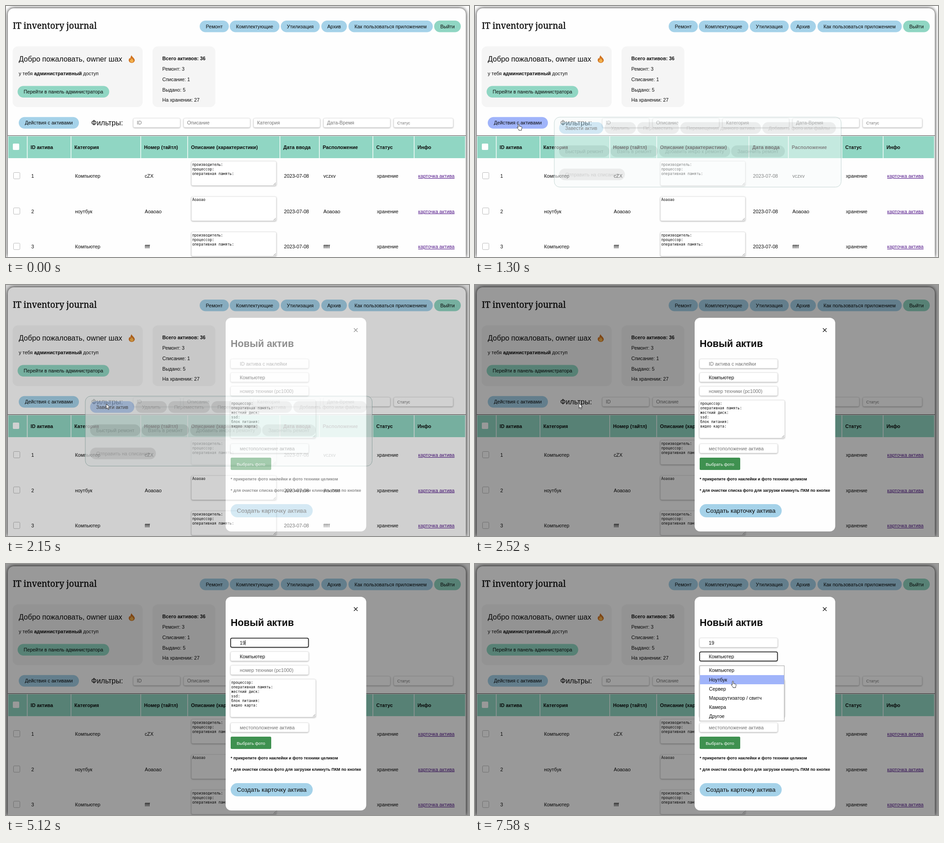
Recreate the animation shown at these times as an HTML page. Size 1016 by 551 pixels, loop 8 s.

```html
<!DOCTYPE html>
<html lang="ru">
<head>
<meta charset="utf-8">
<title>Учёт активов</title>
<style>
html, body { margin: 0; width: 100%; height: 100%; overflow: hidden; background: #fff; }
#page { position: absolute; left: 4px; top: 5px; right: 7px; bottom: 0; border-radius: 13px 13px 0 0;
  background: #fefefe; box-shadow: 0 0 8px rgba(0,0,0,.95); }
svg { position: absolute; left: 0; top: 0; width: 100%; height: 100%; overflow: hidden;
  font: 10.72px "Liberation Sans", Arial, sans-serif; }
text { white-space: pre; fill: #0b0b0b; }
.b { font-weight: 700; }
.ph { fill: #757575; }
.off { fill: #a3a3a3; }
.light { fill: #fff; }
.mono { font: 8px "DejaVu Sans Mono", monospace; }
.title { font: 19px "Noto Serif", serif; stroke: #0b0b0b; stroke-width: .4px; }
.link { fill: #551a8b; text-decoration: underline; }
.field { fill: #fff; stroke: #ddd; stroke-width: .6; filter: drop-shadow(.7px 1px 1.6px rgba(0,0,0,.33)); }
</style>
</head>
<body>
<div id="page"></div>
<svg id="stage" viewBox="0 0 1016 551" xmlns="http://www.w3.org/2000/svg"></svg>
<script>
const BLUE = '#a5d2e9', GREEN = '#90d6c3', HOVER = '#a0b4fa', LOOP = 8000;

const text = (x, y, s, cls = '', size = 0, extra = '') =>
  `<text x="${x}" y="${y}" class="${cls}"${size ? ` style="font-size:${size}px"` : ''} ${extra}>${s}</text>`;
const rect = (x, y, x2, y2, r, fill, extra = '') =>
  `<rect x="${x}" y="${y}" width="${x2 - x}" height="${y2 - y}" rx="${r}" fill="${fill}" ${extra}/>`;
const pill = (x, x2, y, s, fill, cls = '', id = '') =>
  rect(x, y, x2, y + 25.5, 12.7, fill, id && `id="${id}"`) +
  text((x + x2) / 2, y + 16.5, s, cls, 0, 'text-anchor="middle"');
const field = (x, y, x2, y2) => rect(x, y, x2, y2, 3, '#fff', 'class="field"');
const area = (x, y, x2, y2, lines) => field(x, y, x2, y2) +
  lines.map((s, i) => text(x + 1.7, y + 9.7 + i * 10, s, 'mono')).join('') +
  `<path d="M${x2 - 6} ${y2 - 1}l5-5M${x2 - 3} ${y2 - 1}l2-2" stroke="#666" stroke-width=".8"/>`;

function header() {
  const nav = [[425, 489, 'Ремонт'], [491, 600, 'Комплектующие'], [603, 688.5, 'Утилизация'],
    [692, 748, 'Архив'], [751.5, 936.5, 'Как пользоваться приложением'], [939.5, 998, 'Выйти', GREEN]];
  const stats = ['Ремонт: 3', 'Списание: 1', 'Выдано: 5', 'На хранении: 27'];
  const filters = [[279.5, 382, 'ID'], [390, 535.5, 'Описание'], [543.5, 689, 'Категория'],
    [697, 843, 'Дата-Время'], [851, 981, 'Статус', 8.93]];
  return text(15, 49.5, 'IT inventory journal', 'title') +
    nav.map(([a, b, s, c]) => pill(a, b, 32, s, c || BLUE)).join('') +
    rect(14.5, 88.5, 300, 222, 12, '#f5f5f5') + rect(321.5, 88.5, 459.5, 222, 12, '#f5f5f5') +
    text(28, 122, 'Добро пожаловать, owner шах', '', 16.08) +
    '<path d="M275.5 108c.8 4 7 6.500 7 11.300a6.600 5.700 0 0 1-13.200 0c0-2.600 1-4 2-5.600.4 1.200 1 1.800 1.600 2 0-3 1.200-5.400 2.600-7.700z" fill="#cf711f"/>' +
    '<path d="M276 114c.5 2.500 4 4 4 6.300a4 3.600 0 0 1-8 0c0-1.500.8-2.400 1.500-3.300.4.800.7 1 1 1.100 0-1.600.6-3 1.500-4.100z" fill="#f2b04c"/>' +
    text(28, 151.5, 'у тебя <tspan class="b">административный</tspan> доступ') +
    pill(25.5, 226.5, 175.5, 'Перейти в панель администратора', GREEN) +
    text(343, 119, 'Всего активов: 36', 'b') +
    stats.map((s, i) => text(343, 142 + i * 22.8, s)).join('') +
    pill(28, 160, 243.8, 'Действия с активами', BLUE, '', 'actions') +
    text(187, 262, 'Фильтры:', '', 16) +
    filters.map(([a, b, s, size]) => field(a, 246.5, b, 266.5) + text(a + 7.5, 260, s, 'ph', size)).join('');
}

function table() {
  const cols = [54, 150, 303, 406, 608.5, 695, 812.5, 903];
  const heads = ['ID актива', 'Категория', 'Номер (тайтл)', 'Описание (характеристики)',
    'Дата ввода', 'Расположение', 'Статус', 'Инфо'];
  const spec = ['производитель:', 'процессор:', 'оперативная память:'];
  const rows = [['Компьютер', 'cZX', spec, 'vczxv'], ['ноутбук', 'Аоаоао', ['Аоаоао'], 'Аоаоао'],
    ['Компьютер', 'ffff', spec, 'fffff']];
  let out = rect(5, 286, 1007.5, 334, 0, GREEN) + rect(4, 284, 1009, 285, 0, '#444') +
    rect(15, 302, 29, 316, 2, '#fff') +
    cols.map((x, i) => rect(x - 8.1, 286, x - 6.7, 334, 0, '#fff') + text(x, 313.5, heads[i], 'b')).join('');
  rows.forEach(([kind, name, lines, place], i) => {
    const y = 334 + i * 77.6, base = y + 43;
    const cells = [i + 1, kind, name, '', '2023-07-08', place, 'хранение'];
    out += rect(6, y, 1007, y + 77.6, 0, '#f5f5f5', `id="row${i}" opacity="0"`) +
      rect(16.5, y + 31.5, 30.5, y + 45.5, 2, '#fff', 'stroke="#aaa" stroke-width=".8"') +
      cells.map((s, c) => text(cols[c] + 1.5, base, s)).join('') +
      text(904.5, base, 'карточка актива', 'link') +
      area(407, y + 6.8, 593, y + 60, lines);
  });
  return out;
}

function menu() {
  const rows = [
    [255, [284.5, 353, 'Удалить'], [356, 447.5, 'Переместить'],
      [450.5, 627.5, 'Перемещения данного актива'], [630.5, 792, 'Добавить фото или файлы']],
    [306, [184.5, 295, 'Быстрый ремонт'], [297.5, 401.5, 'Взять в ремонт'],
      [404, 560, 'Добавить инфо к ремонту'], [562, 680, 'Закончить ремонт']],
    [357, [184.5, 329, 'Отправить на списание']]];
  return rect(174, 244, 803.5, 397.5, 12, '#f8fcfc', 'stroke="#8fb0ab" stroke-width="1"') +
    pill(184.5, 281.5, 255, 'Завести актив', BLUE, '', 'create') +
    rows.map(([y, ...items]) => items.map(([a, b, s]) => pill(a, b, y, s, '#d9dcdc', 'off')).join('')).join('');
}

function modal() {
  const input = (y, s, cls, id) => field(493, y, 664, y + 20.3) + text(513, y + 14, s, cls, 0, id ? `id="${id}"` : '');
  const spec = ['процессор:', 'оперативная память:', 'жесткий диск:', 'ssd:', 'блок питания:', 'видео карта:'];
  const kinds = ['Компьютер', 'Ноутбук', 'Сервер', 'Маршрутизатор / свитч', 'Камера', 'Другое'];
  return rect(0, 0, 1016, 551, 0, '#000', 'opacity=".4"') +
    rect(482, 72, 790.5, 541, 12, '#fefefe') +
    '<path d="M763.500 95l8 8m0-8l-8 8" stroke="#111" stroke-width="1.2"/>' +
    text(493, 135.5, 'Новый актив', 'b', 21.44) +
    input(162.5, 'ID актива с наклейки', 'ph', 'assetId') + input(192.5, 'Компьютер') +
    input(222.6, 'номер техники (pc1000)', 'ph') +
    area(492.5, 253, 679.5, 336, spec) + input(348.6, 'местоположение актива', 'ph') +
    rect(493, 379, 582, 406, 2.5, '#3f9150') +
    text(537.5, 396.5, 'Выбрать фото', 'light', 9.38, 'text-anchor="middle"') +
    text(493, 429.3, '* прикрепите фото наклейки и фото техники целиком', 'b', 8.9) +
    text(493, 454.2, '* для очистки списка фото для загрузки кликнуть ПКМ по кнопке', 'b', 8.9) +
    rect(493, 481, 673, 510, 14.5, BLUE) +
    text(583, 500, 'Создать карточку актива', '', 13.35, 'text-anchor="middle"') +
    rect(493, 162.8, 663.6, 182.8, 3, 'none', 'id="focus" stroke="#111" stroke-width="1.5"') +
    rect(0, 167, .9, 178.5, 0, '#111', 'id="caret"') +
    `<g id="list">${rect(493, 223.3, 678.7, 344.8, 0, '#fff', 'stroke="#999" stroke-width=".9"')}` +
    rect(493.5, 223.7, 678.2, 243.8, 0, HOVER, 'id="pick"') +
    kinds.map((s, i) => text(513.5, 237.4 + i * 20.1, s)).join('') + '</g>';
}

const cursors = '<circle id="glow" r="8" fill="#f7ef4a"/><g id="cursor" stroke-linejoin="round">' +
  '<path id="arrow" d="M0 0v11l2.500-2.400 1.700 4 2-.9-1.700-3.800h3.500z" fill="#fff" stroke="#222" stroke-width=".9"/>' +
  '<path id="hand" d="M-1.300 8V.8a1.200 1.200 0 0 1 2.400 0V5l1.800.3 1.900.4 1.500.8q.9.600.8 2L6 12v2H.2v-1.500L-3.500 8.500q-.6-1.500.8-1.600z" fill="#fff" stroke="#222" stroke-width=".9"/>' +
  '<path id="beam" d="M-2.500-6H-.7L0-5.400.7-6h1.800M0-5.400V5.400M-2.500 6H-.7L0 5.400.7 6h1.800" fill="none" stroke="#111" stroke-width=".9"/></g>';

document.getElementById('stage').innerHTML = header() + table() +
  `<g id="menu">${menu()}</g><g id="modal">${modal()}</g>` + cursors;

const ui = {};
document.querySelectorAll('#stage [id]').forEach(n => ui[n.id] = n);
const show = (id, v) => ui[id].setAttribute('opacity', +v);
const ramp = (t, a, b) => {
  const k = Math.min(1, Math.max(0, (t - a) / (b - a)));
  return k * k * (3 - 2 * k);
};
const within = (t, a, b) => t >= a && t < b;
const mix = (a, b, k) => {
  const part = (c, i) => parseInt(c.slice(i, i + 2), 16);
  return `rgb(${[1, 3, 5].map(i => Math.round(part(a, i) + (part(b, i) - part(a, i)) * k))})`;
};

// time, x, y of the pointer; an "e" eases the way into that point
const path = [[0, 650, 570], [60, 645, 556], [250, 550, 440], [420, 444, 334], [490, 364, 315],
  [700, 225, 283], [860, 150, 270], [930, 126, 264], [1080, 96, 259], [1370, 96, 259],
  [1720, 220, 261, 'e'], [2450, 220, 261], [3260, 597, 195, 'e'], [3330, 597, 195],
  [3650, 567, 173, 'e'], [5600, 567, 173], [5920, 571, 204.5, 'e'], [7080, 571, 204.5],
  [7580, 566, 257.5, 'e'], [LOOP, 566, 257.5]];
// time, shape from that time on
const shapes = [[0, 'arrow'], [910, 'hand'], [1440, 'arrow'], [1600, 'hand'], [1900, 'arrow'],
  [3100, 'hand'], [3440, 'beam'], [4480, ''], [5630, 'beam'], [5800, 'hand']];
const clicks = [[1010, 240], [1790, 180], [3720, 230], [6400, 380]];
// time, caret x (0 = hidden)
const carets = [[0, 0], [3760, 513], [4410, 0], [4480, 518.7], [5060, 0], [5120, 524.6],
  [5630, 0], [6210, 524.6], [6400, 0]];
const last = (list, t) => list.filter(r => r[0] <= t).pop();

function pointer(t) {
  const i = path.findIndex((p, n) => n && t <= p[0]);
  const a = path[i - 1], b = path[i];
  const k = b[3] ? ramp(t, a[0], b[0]) : (t - a[0]) / (b[0] - a[0]);
  return [a[1] + (b[1] - a[1]) * k, a[2] + (b[2] - a[2]) * k];
}

function draw(t) {
  const [x, y] = pointer(t);
  const shape = last(shapes, t)[1];
  ui.cursor.setAttribute('transform', `translate(${x} ${y})`);
  ['arrow', 'hand', 'beam'].forEach(s => show(s, s === shape));

  const click = clicks.find(([s, d]) => within(t, s, s + d));
  show('glow', click ? .75 * (1 - ((t - click[0]) / click[1]) ** 2) : 0);
  ui.glow.setAttribute('cx', x - .5);
  ui.glow.setAttribute('cy', y);

  for (let i = 0; i < 3; i++) {
    const top = 334 + i * 77.6;
    show('row' + i, t < 500 && y < 551 && y >= top && y < top + 77.6);
  }

  ui.actions.setAttribute('fill', mix(BLUE, HOVER, ramp(t, 900, 1100) - ramp(t, 1430, 1640)));
  ui.create.setAttribute('fill', mix(BLUE, HOVER, ramp(t, 1590, 1760) - ramp(t, 1900, 2400)));
  show('menu', ramp(t, 1050, 1550) - ramp(t, 2020, 2390));
  show('modal', ramp(t, 1930, 2400));

  const typed = t < 4480 ? '' : t < 5120 ? '1' : '19';
  ui.assetId.textContent = typed || 'ID актива с наклейки';
  ui.assetId.setAttribute('class', typed ? '' : 'ph');
  const caret = last(carets, t)[1];
  show('caret', caret > 0);
  ui.caret.setAttribute('x', caret);
  show('focus', t >= 3760);
  ui.focus.setAttribute('y', t < 6400 ? 162.8 : 192.9);

  show('list', ramp(t, 6450, 6620));
  ui.pick.setAttribute('y', y < 244 ? 223.7 : 243.9);
}

const start = performance.now();
function tick() {
  draw((performance.now() - start) % LOOP);
  requestAnimationFrame(tick);
}
tick();
</script>
</body>
</html>
```
